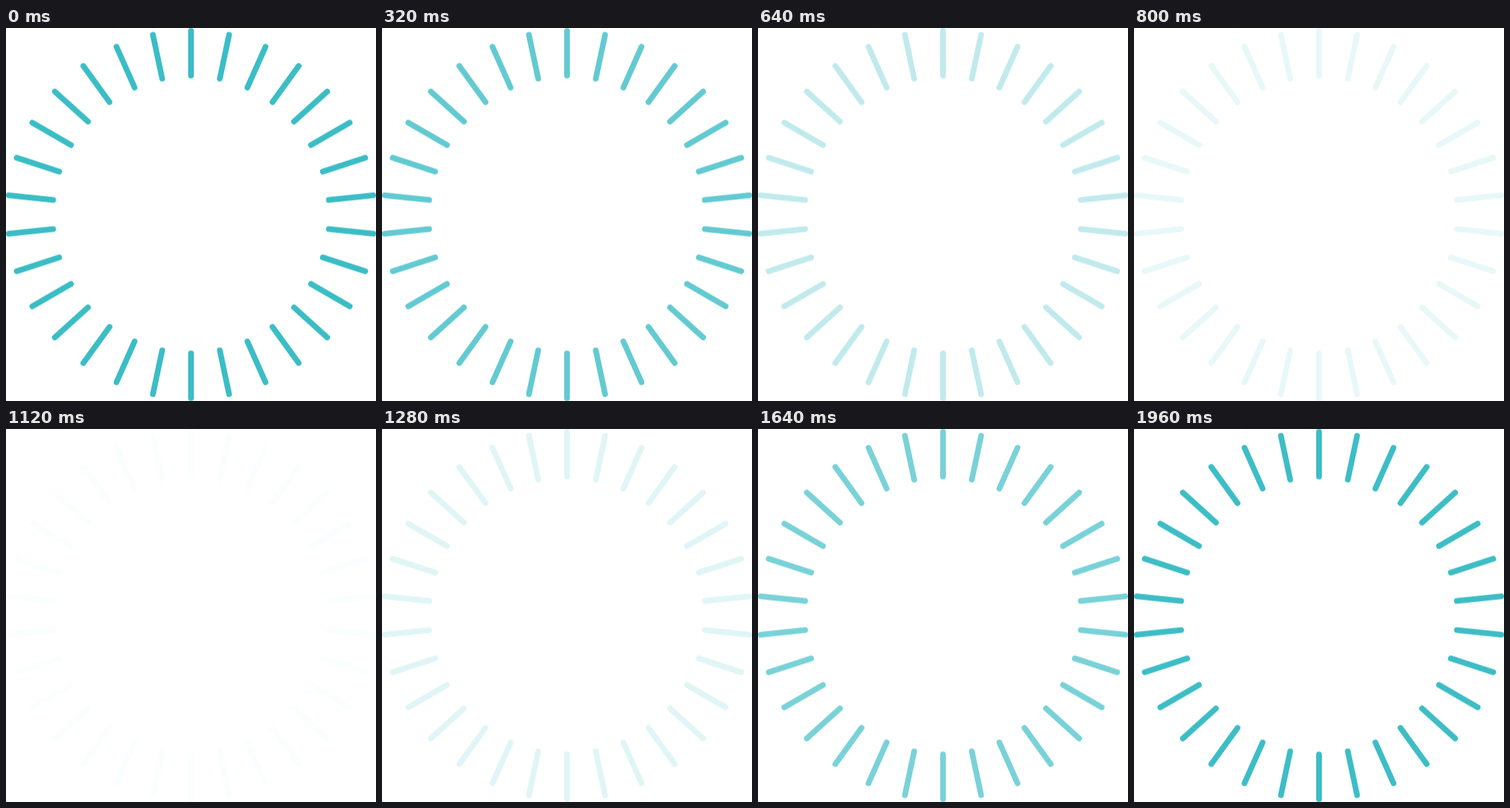
Write an HTML page that moves like this. It is 522 px wide and 525 px high and loops after 2000 ms.

```html
<!DOCTYPE html>
<html lang="en">
<head>
<meta charset="utf-8">
<title>Pulsing rays</title>
<style>
  html, body { margin: 0; width: 100%; height: 100%; overflow: hidden; background: #fff; }
  svg { display: block; width: 100%; height: 100%; }
</style>
</head>
<body>
<svg viewBox="0 0 522 525">
  <g id="rays" transform="translate(261 262.5)" stroke="#3bbdc6" stroke-width="8" stroke-linecap="round"></g>
</svg>
<script>
const RAYS = 30, PERIOD = 2000, STEP = 40, DELAY = 20;
const rays = document.getElementById('rays');

rays.innerHTML = Array.from({ length: RAYS }, (_, i) =>
  `<line y1="-258.5" y2="-195.5" transform="rotate(${i * 360 / RAYS})"/>`).join('');

// Sine fade: opaque at the start of the loop, gone halfway through
function draw() {
  const t = Math.floor(performance.now() % PERIOD / STEP) * STEP - DELAY;
  rays.setAttribute('opacity', (1 + Math.cos(2 * Math.PI * t / PERIOD)) / 2);
  requestAnimationFrame(draw);
}
draw();
</script>
</body>
</html>
```
